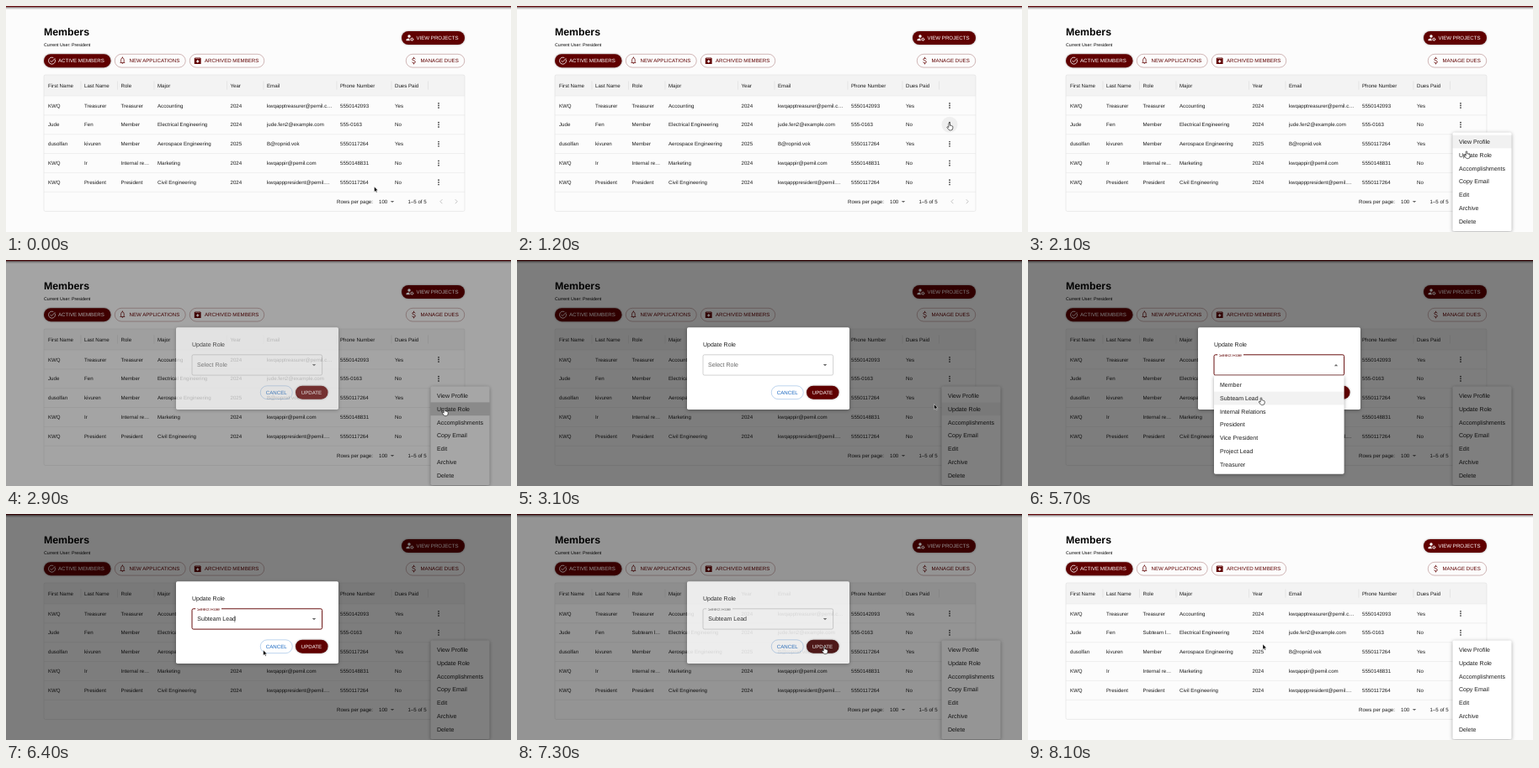
An HTML page for the animation above (8200 ms loop, 600 by 269 pixels).

```html
<!DOCTYPE html>
<html lang="en">
<head>
<meta charset="utf-8">
<title>Members</title>
<style>
html, body { margin: 0; width: 100%; height: 100%; overflow: hidden; background: #fcfcfc; }
svg { display: block; width: 100vw; height: 100vh; }
text { font-family: "Liberation Sans", Arial, Helvetica, sans-serif; text-rendering: geometricPrecision; white-space: pre; }
.paper { filter: drop-shadow(0 1.5px 2px rgba(0, 0, 0, .35)); }
</style>
</head>
<body>
<svg id="stage" viewBox="0 0 600 269" xmlns="http://www.w3.org/2000/svg"></svg>
<script>
const LOOP = 8200;
const RED = '#600000', INK = '#1d1d1d', LINE = '#e0e0e0';
const SMALL = 6.13, BODY = 7.03, STEP = 15.8, ROW = 22.85;

const text = (x, mid, str, size = SMALL, fill = INK, extra = '') =>
  `<text x="${x}" y="${mid + size * .36}" font-size="${size}" fill="${fill}" ${extra}>${str}</text>`;
const rect = (x, y, w, h, fill, extra = '') =>
  `<rect x="${x}" y="${y}" width="${w}" height="${h}" fill="${fill}" ${extra}/>`;
const path = (d, extra = '') => `<path d="${d}" ${extra}/>`;
const dot = (x, y, r, extra = '') => `<circle cx="${x}" cy="${y}" r="${r}" ${extra}/>`;
const stroke = (color, width) => `fill="none" stroke="${color}" stroke-width="${width}"`;

function pill(x, mid, w, label, tx, filled, icon, color = RED) {
  const box = filled
    ? rect(x, mid - 8, w, 16, color, 'rx="8" style="filter:drop-shadow(0 .8px .9px rgba(0,0,0,.4))"')
    : rect(x + .25, mid - 7.9, w - .5, 15.8, 'none', `rx="7.9" stroke="${color}" stroke-opacity=".55" stroke-width=".5"`);
  return box + icon + text(tx, mid, label, SMALL, filled ? '#fff' : color);
}

const columns = [50, 93, 136.5, 180, 266.5, 310, 397, 462];
const heads = ['First Name', 'Last Name', 'Role', 'Major', 'Year', 'Email', 'Phone Number', 'Dues Paid'];
const members = [
  ['KWQ', 'Treasurer', 'Treasurer', 'Accounting', '2024', 'kwqapptreasurer@pemil.c…', '5550142093', 'Yes'],
  ['Jude', 'Fen', 'Member', 'Electrical Engineering', '2024', 'jude.fen2@example.com', '555-0163', 'No'],
  ['dusolfan', 'kivuren', 'Member', 'Aerospace Engineering', '2025', 'B@ropnid.vok', '5550117264', 'Yes'],
  ['KWQ', 'Ir', 'Internal re…', 'Marketing', '2024', 'kwqappir@pemil.com', '5550148831', 'No'],
  ['KWQ', 'President', 'President', 'Civil Engineering', '2024', 'kwqapppresident@pemil.…', '5550117264', 'No']
];
const actions = ['View Profile', 'Update Role', 'Accomplishments', 'Copy Email', 'Edit', 'Archive', 'Delete'];
const roles = ['Member', 'Subteam Lead', 'Internal Relations', 'President', 'Vice President', 'Project Lead', 'Treasurer'];

const icons = {
  check: path('M58.2 63.6A4 4 0 1 1 56.3 61.6M52.6 65L54.2 66.6L58.3 62.3', stroke('#fff', .8)),
  bell: path('M135.8 67.5L136.6 66.6V64.3Q136.6 62 138.4 61.7Q140.2 62 140.2 64.3V66.6L141 67.5Z', stroke(RED, .75)) +
    dot(138.4, 61.2, .6, `fill="${RED}"`) + path('M137.5 68.3H139.3Q138.4 69.9 137.5 68.3Z', `fill="${RED}"`),
  archive: path('M224.6 61.5H230.8L231.6 62.6V69H223.8V62.6Z', `fill="${RED}"`) +
    path('M224.9 62.4H230.5', stroke('#fff', .45)) +
    path('M225.5 65.6H227V64.2H228.4V65.6H229.9L227.7 67.8Z', 'fill="#fff"'),
  dollar: path('M486.2 63.4Q485.9 62.3 484.5 62.3Q482.8 62.3 482.8 63.6Q482.8 64.6 484.5 65Q486.4 65.4 486.4 66.6Q486.4 67.9 484.5 67.9Q482.8 67.9 482.6 66.6M484.5 60.8V62.3M484.5 67.9V69.4', stroke(RED, .8)),
  person: dot(479, 36, 1.75, 'fill="#fff"') +
    path('M475.5 41.3V40.2Q475.8 38.5 479.2 38.4Q479 40 480 41.3Z', 'fill="#fff"') +
    dot(482.3, 39.7, 1.25, stroke('#fff', .9)) +
    dot(482.3, 39.7, 1.8, 'fill="none" stroke="#fff" stroke-width=".6" stroke-dasharray=".95 .935"')
};

function page() {
  let out = rect(0, 0, 600, 269, '#fcfcfc') +
    rect(0, 0, 600, 4.5, 'url(#shade)') + rect(0, 0, 600, 1.3, '#650d10') +
    text(45, 30.8, 'Members', 12.3, '#000', 'font-weight="bold"') +
    text(45, 46.5, 'Current User: President', 5.27, '#000') +
    pill(45, 65.2, 79.5, 'ACTIVE MEMBERS', 62, true, icons.check) +
    pill(129, 65.2, 84.5, 'NEW APPLICATIONS', 146.5, false, icons.bell) +
    pill(218, 65.2, 89, 'ARCHIVED MEMBERS', 236, false, icons.archive) +
    pill(470, 38, 75, 'VIEW PROJECTS', 487.5, true, icons.person) +
    pill(475, 65.2, 70, 'MANAGE DUES', 492.5, false, icons.dollar);

  out += rect(45, 82, 500, 25, '#f3f3f3');
  heads.forEach((h, i) => out += text(columns[i], 94.3, h));
  [89, 132.5, 176, 262.5, 306, 393, 458, 501.5].forEach(x =>
    out += path(`M${x} 89.5V99.5`, stroke('#dcdcdc', .6)));
  members.forEach((m, r) => {
    const top = 107 + r * ROW, mid = top + ROW / 2;
    out += path(`M45 ${top}H545`, stroke(LINE, .5));
    m.forEach((cell, c) => out += text(columns[c], mid, cell, SMALL, INK, r === 1 && c === 2 ? 'id="role"' : ''));
    if (r === 1) out += dot(514, mid, 9.5, 'id="halo" fill="#000" opacity="0"');
    [-2.65, 0, 2.65].forEach(dy => out += dot(514, mid + dy, .85, 'fill="#333"'));
  });
  out += path('M45 221.3H545', stroke(LINE, .5)) +
    rect(45, 82, 500, 162.4, 'none', `rx="1.8" stroke="${LINE}" stroke-width=".6"`) +
    text(393, 232.7, 'Rows per page:') + text(443, 232.7, '100') +
    path('M456.8 231.9H461.2L459 234.1Z', 'fill="#666"') +
    text(477.5, 232.7, '1–5 of 5') +
    path('M518.4 230.2L515.9 232.7L518.4 235.2M533.7 230.2L536.2 232.7L533.7 235.2', stroke('#b5b5b5', .8));
  return out;
}

function dialog() {
  return `<g id="dialog"><g class="paper">${rect(202, 80.3, 193, 97.7, '#fff', 'rx="1.8"')}</g>` +
    text(221, 100.2, 'Update Role', BODY) +
    path('', 'id="field" fill="none"') +
    text(227, 124.9, 'Select Role', BODY, '#666', 'id="label"') +
    `<g clip-path="url(#content)">${text(227, 112.7, 'Select Role', 5.27, RED, 'id="float"')}</g>` +
    text(227.3, 124.9, 'Subteam Lead', BODY, INK, 'id="value"') +
    path('', 'id="caret" stroke="#222" stroke-width=".5"') +
    path('', 'id="arrow" fill="#666"') +
    pill(302, 157.7, 38.5, 'CANCEL', 308.8, false, '', '#1565c0') +
    `<g id="save">${pill(344, 157.7, 38.5, 'UPDATE', 350.8, true, '')}</g></g>`;
}

const list = (names, x, mid) => names.map((n, i) => text(x, mid + i * STEP, n, BODY)).join('');

const svg = document.getElementById('stage');
svg.innerHTML = `<defs>
  <linearGradient id="shade" x2="0" y2="1"><stop stop-color="#000" stop-opacity=".5"/><stop offset="1" stop-color="#000" stop-opacity="0"/></linearGradient>
  <clipPath id="content"><rect x="202" y="112.3" width="193" height="40"/></clipPath></defs>` +
  page() +
  `<g id="menu"><g class="paper">${rect(504.5, 150.5, 70, 117.6, '#fff', 'rx="1.8"')}</g>` +
  rect(504.5, 153.6, 70, STEP, '#000', 'id="first"') +
  rect(504.5, 153.6 + STEP, 70, STEP, '#000', 'id="second"') +
  list(actions, 512, 161.5) + '</g>' +
  rect(0, 0, 600, 269, '#000', 'id="backdrop"') + dialog() +
  `<g id="popup"><g class="paper">${rect(221, 137.4, 154.6, 117.4, '#fff', 'rx="1.8"')}</g>` +
  rect(221, 0, 154.6, STEP, '#000', 'id="pick" opacity=".05"') +
  list(roles, 228, 148.5) + '</g>' +
  '<g id="cursor">' +
  path('M0 0V6.2L1.5 4.9L2.5 7.1L3.5 6.7L2.5 4.6H4.4Z', 'id="pointer" fill="#000" stroke="#fff" stroke-width=".45"') +
  path('M-.8.6Q-.8-.2 0-.2Q.8-.2.8.6V3Q1.6 2.6 2.1 3.2Q2.9 2.9 3.2 3.6Q4.2 3.4 4.2 4.6V6Q4.2 8.6 1.6 8.6H.6Q-.6 8.4-1.4 7L-2.8 5Q-2.6 4-1.5 4.6L-.8 5.2Z', 'id="hand" fill="#fff" stroke="#000" stroke-width=".6"') +
  path('M-1.4-3.5Q0-3.5 0-2.7Q0-3.5 1.4-3.5M0-2.7V2.7M-1.4 3.5Q0 3.5 0 2.7Q0 3.5 1.4 3.5M-.8.9H.8', 'id="beam" fill="none" stroke="#111" stroke-width=".6"') +
  '</g>';

const el = {};
svg.querySelectorAll('[id]').forEach(n => el[n.id] = n);
const set = (id, name, value) => el[id].setAttribute(name, value);
const show = (id, on) => set(id, 'display', on ? 'inline' : 'none');

const clamp = u => Math.max(0, Math.min(1, u));
const span = (t, start, length) => clamp((t - start) / length);
const smooth = u => u * u * (3 - 2 * u);
const easeOut = u => 1 - (1 - u) ** 2;
const within = (t, a, b) => t >= a && t < b;

// time, x, y of the cursor tip
const track = [
  [0, 437.5, 215], [1250, 514, 139], [1600, 514, 139], [2100, 521, 173], [2300, 521, 173],
  [2700, 521, 177], [2950, 521, 177], [3650, 308, 131.5], [4150, 308, 131.5], [5050, 277, 164],
  [6000, 277, 164], [7050, 365, 158], [7800, 365, 158], [8100, 279, 155]
];

function cursorAt(t) {
  const next = track.findIndex(k => k[0] > t);
  if (next < 0) return track[track.length - 1].slice(1);
  const a = track[next - 1], b = track[next], u = smooth(span(t, a[0], b[0] - a[0]));
  return [a[1] + (b[1] - a[1]) * u, a[2] + (b[2] - a[2]) * u];
}

function cursorKind(t, x, y) {
  if (t < 1450) return x > 505 && y < 152 ? 'hand' : 'pointer';
  if (t < 2950) return y > 151 || t < 1500 ? 'hand' : 'pointer';
  if (t < 5880) {
    if (x > 375.5) return 'pointer';
    return y < 137.4 ? 'beam' : 'hand';
  }
  return within(t, 6000, 7420) && x > 344 ? 'hand' : 'pointer';
}

function drawField(t) {
  const focused = within(t, 3950, 7180), floated = t >= 3950, open = within(t, 3950, 5880);
  const chosen = t >= 5880;
  set('field', 'd', (floated ? 'M256 112.8' : 'M222.8 112.8') +
    'H373.8Q375.6 112.8 375.6 114.6V135.3Q375.6 137.1 373.8 137.1H222.8Q221 137.1 221 135.3V114.6Q221 112.8 222.8 112.8' +
    (floated ? 'H225.2' : 'Z'));
  set('field', 'stroke', focused ? RED : '#a5a5a5');
  set('field', 'stroke-width', focused ? .95 : .5);
  show('label', !floated);
  show('float', floated);
  set('float', 'fill', focused ? RED : '#666');
  show('value', chosen);
  const cx = chosen ? 271.8 : 227.5;
  set('caret', 'd', `M${cx} 121V129`);
  show('caret', focused && (t - 3950) % 1060 < 530);
  set('arrow', 'd', open ? 'M363.8 126.2H368.2L366 124Z' : 'M363.8 124H368.2L366 126.2Z');
  show('popup', open);
}

function draw(t) {
  const [x, y] = cursorAt(t);
  const kind = cursorKind(t, x, y);
  set('cursor', 'transform', `translate(${x} ${y})`);
  ['pointer', 'hand', 'beam'].forEach(k => show(k, k === kind));

  set('halo', 'opacity', t < 1500 && kind === 'hand' ? .05 : 0);
  el.role.textContent = t >= 7230 ? 'Subteam l…' : 'Member';

  const grow = easeOut(span(t, 1440, 250));
  show('menu', grow > 0);
  set('menu', 'opacity', grow);
  set('menu', 'transform', `translate(514 150.5) scale(${.75 + .25 * grow} ${.56 + .44 * grow}) translate(-514 -150.5)`);
  set('first', 'opacity', t < 2750 ? .055 : 0);
  const hover = .04 * span(t, 2110, 150) + .13 * span(t, 2750, 100);
  set('second', 'opacity', hover * (1 - span(t, 2950, 200)));

  const fade = easeOut(span(t, 2800, 225)) * (1 - smooth(span(t, 7250, 195)));
  set('backdrop', 'opacity', fade * .5);
  set('dialog', 'opacity', fade);
  show('dialog', fade > 0);
  drawField(t);

  const row = Math.floor((y - 140.8) / STEP);
  show('pick', x < 375.5 && row >= 0 && row < roles.length);
  set('pick', 'y', 140.8 + row * STEP);
  el.save.firstElementChild.setAttribute('fill', t > 6000 && x > 344 ? '#400000' : RED);
}

const begin = performance.now();
function tick() {
  draw((performance.now() - begin) % LOOP);
  requestAnimationFrame(tick);
}
tick();
</script>
</body>
</html>
```
